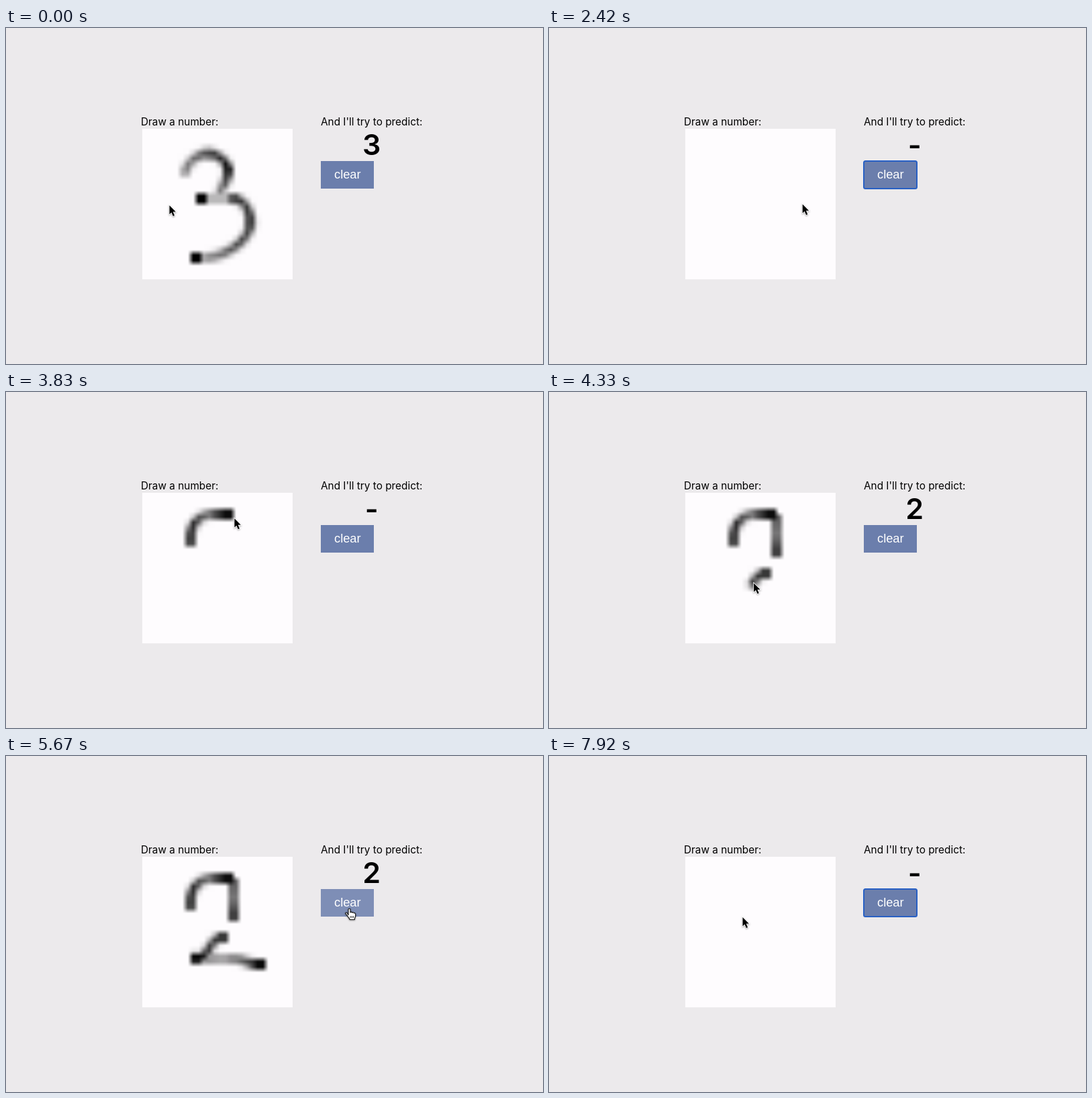
An HTML page with a canvas for the animation above (8000 ms loop, 800x500 px).

```html
<!DOCTYPE html>
<html lang="en">
<head>
<meta charset="utf-8">
<title>Draw a number</title>
<style>
  html, body { margin: 0; width: 100%; height: 100%; overflow: hidden; background: #eceaec; }
  canvas { position: absolute; left: 203px; top: 150px; width: 224px; height: 224px; }
  svg { position: absolute; left: 0; top: 0; width: 800px; height: 500px; }
  text { font-family: Inter, "Open Sans", sans-serif; font-size: 15.35px; }
  #digit { font-size: 43px; font-weight: 600; text-anchor: middle; }
  #label { font-family: "Liberation Sans", Arial, sans-serif; font-size: 18.3px; fill: #fff; }
  #arrow, #hand { filter: drop-shadow(0 1px 1px rgba(0, 0, 0, .35)); }
</style>
</head>
<body>
<canvas id="pad" width="28" height="28"></canvas>
<svg viewBox="0 0 800 500">
  <text x="201" y="145">Draw a number:</text>
  <text x="469" y="145">And I'll try to predict:</text>
  <text id="digit" x="544.7"></text>
  <rect id="button" x="469" y="198" width="79" height="41"/>
  <rect id="ring" x="469" y="198" width="79" height="41" rx="2.5" fill="none" stroke="#2860c4" stroke-width="2"/>
  <text id="label" x="489" y="224">clear</text>
  <path id="arrow" d="M.5 1V14.2L3.5 11.4 5.9 16.9 8.1 15.9 5.8 10.5H9.9Z"
        stroke="#fff" stroke-width="1.6" paint-order="stroke"/>
  <g id="hand" stroke="#111" stroke-width="1.1" stroke-linejoin="round">
    <path fill="#fff" d="M-1.5 9.6V1.5a1.5 1.5 0 0 1 3 0V6c.2-1.3 2.6-1.2 2.8.3.5-1 2.5-.8 2.7.7.6-.8 2.2-.4 2.2 1v2.7c0 2-.8 3-1.3 4.2v1.6H.7c-.5-2-2.2-3.2-3.4-5.2-1-1.6-2.2-2.8-2.8-3.6-.9-1.3.7-2.4 2-1.5z"/>
    <path d="M1.6 11v3M3.9 11v3M6.2 11v3" stroke-width=".9"/>
  </g>
</svg>
<script>
const LOOP = 8000, STEP = 1000 / 12, SIZE = 28;
const FIRST_CLEAR = 2160, PRESS = 3330, SECOND_CLEAR = 7080;
const $ = id => document.getElementById(id);
const ctx = $('pad').getContext('2d');
const image = ctx.createImageData(SIZE, SIZE);

const clamp = v => Math.max(0, Math.min(1, v));
const lerp = (a, b, p) => a + (b - a) * p;
const within = (t, a, b) => t >= a && t < b;
const easeOut = p => 1 - (1 - p) ** 2;

// A curve with a function giving the point at a share of its length.
function curve(d) {
  const path = document.createElementNS('http://www.w3.org/2000/svg', 'path');
  path.setAttribute('d', d);
  const length = path.getTotalLength();
  return { length, at: p => path.getPointAtLength(p * length) };
}

// Pen strokes run in pad cells; tones are spread evenly along the stroke.
function stroke(d, tones, from = -1, to = 0) {
  const c = curve(d);
  const at = p => {
    const { x, y } = c.at(p);
    return { x: 204.5 + x * 8, y: 148 + y * 8 };
  };
  return { ...c, tones, from, to, pen: c.at, at };
}

function move(from, to, d) {
  const c = curve(d);
  return { from, to, at: p => c.at(easeOut(p)) };
}

const three = [
  stroke('M8 8C9 4.5 14 3 16 7.3Q16 9.5 14.5 11.5', [.45, .65, .95, .5]),
  stroke('M13 13H17', [.27]),
  stroke('M17 13C19 13.2 20.1 15.2 20.1 17.5C20.1 20.5 16 23.6 12 24', [.8, .75, .7, .4]),
  stroke('M11 13h0', [1]),
  stroke('M10 24h0', [1])
];
const two = [
  stroke('M9 9V8Q9.4 4.3 13 4H16', [.7, .85, .5, .95], PRESS, 3755),
  stroke('M17 5V11', [.6, .5, .75], 3840, 4000),
  stroke('M15 15C12.5 15 12.5 18.9 10 18.9', [.8, .75, 1], 4165, 4505),
  stroke('M12 19H17C19 19 19.5 20 22 20', [.4, .3, .6, .97], 4590, 4910)
];

// In the gaps the pointer glides from one end to the next start.
const actions = [
  move(83, 750, 'M243 263C270 345 430 340 469 234'),
  move(917, 1083, 'M469 234L497 222'),
  move(2083, 3250, 'M497 222C370 260 290 310 275 222'),
  ...two,
  move(4917, 5333, 'M380 308L529 225'),
  move(5417, 5667, 'M529 225L511.5 227'),
  move(7250, 7917, 'M511.5 227L288 239')
];

function pointer(t) {
  const next = actions.findIndex(a => a.to > t);
  if (next < 0) return actions[actions.length - 1].at(1);
  const a = actions[next];
  if (t >= a.from || next === 0) return a.at(clamp((t - a.from) / (a.to - a.from)));
  const prev = actions[next - 1], p = (t - prev.to) / (a.from - prev.to);
  const start = prev.at(1), end = a.at(0);
  return { x: lerp(start.x, end.x, p), y: lerp(start.y, end.y, p) };
}

function toneAt(tones, p) {
  const pos = p * (tones.length - 1), i = Math.floor(pos);
  return lerp(tones[i], tones[Math.min(i + 1, tones.length - 1)], pos - i);
}

// Lays a square dab of half size r, keeping the darkest value.
function dab(cells, x, y, r, tone) {
  for (let row = Math.floor(y - r); row < y + r; row++) {
    for (let col = Math.floor(x - r); col < x + r; col++) {
      const w = Math.min(col + 1, x + r) - Math.max(col, x - r);
      const h = Math.min(row + 1, y + r) - Math.max(row, y - r);
      const k = row * SIZE + col;
      cells[k] = Math.max(cells[k], tone * w * h);
    }
  }
}

// Slanted parts get a smaller dab so that the line keeps its width.
function paint(cells, s, t) {
  const done = clamp((t - s.from) / (s.to - s.from));
  const count = Math.ceil(done * s.length * 8);
  for (let i = 0; i <= count; i++) {
    const p = count ? done * i / count : 0;
    const { x, y } = s.pen(p);
    const a = s.pen(Math.max(0, p - .01)), b = s.pen(Math.min(1, p + .01));
    const dx = b.x - a.x, dy = b.y - a.y;
    const r = Math.hypot(dx, dy) / (Math.abs(dx) + Math.abs(dy)) || 1;
    dab(cells, x, y, r, toneAt(s.tones, p));
  }
}

function drawPad(t) {
  const cells = new Float32Array(SIZE * SIZE);
  const shown = t < FIRST_CLEAR ? three : t < SECOND_CLEAR ? two : [];
  shown.filter(s => t >= s.from).forEach(s => paint(cells, s, t));
  cells.forEach((dark, k) => {
    const light = 1 - dark;
    image.data.set([254 * light, 252 * light, 254 * light, 255], k * 4);
  });
  ctx.putImageData(image, 0, 0);
}

ctx.font = '600 43px Inter, "Open Sans", sans-serif';
const dash = ctx.measureText('-');
const dashY = 176.6 + (dash.actualBoundingBoxAscent - dash.actualBoundingBoxDescent) / 2;

function render(t) {
  drawPad(t);
  const digit = t < 2400 ? '3' : within(t, 4330, 7330) ? '2' : '-';
  $('digit').textContent = digit;
  $('digit').setAttribute('y', digit === '-' ? dashY : 189.3);

  const hover = within(t, 1495, 2200) || within(t, 5300, 7300);
  const focus = within(t, FIRST_CLEAR, PRESS) || t >= SECOND_CLEAR;
  $('button').setAttribute('fill', hover ? '#7e8eb6' : '#6b7eac');
  $('ring').setAttribute('visibility', focus ? 'visible' : 'hidden');

  const { x, y } = pointer(t);
  for (const id of ['arrow', 'hand']) {
    $(id).setAttribute('transform', `translate(${x} ${y})`);
    $(id).setAttribute('visibility', hover === (id === 'hand') ? 'visible' : 'hidden');
  }
}

const start = performance.now();
let last = -1;
function tick() {
  const t = (performance.now() - start) % LOOP;
  const step = Math.floor((t + 4) / STEP) % (LOOP / STEP);
  if (step !== last) render((last = step) * STEP);
  requestAnimationFrame(tick);
}
tick();
</script>
</body>
</html>
```
